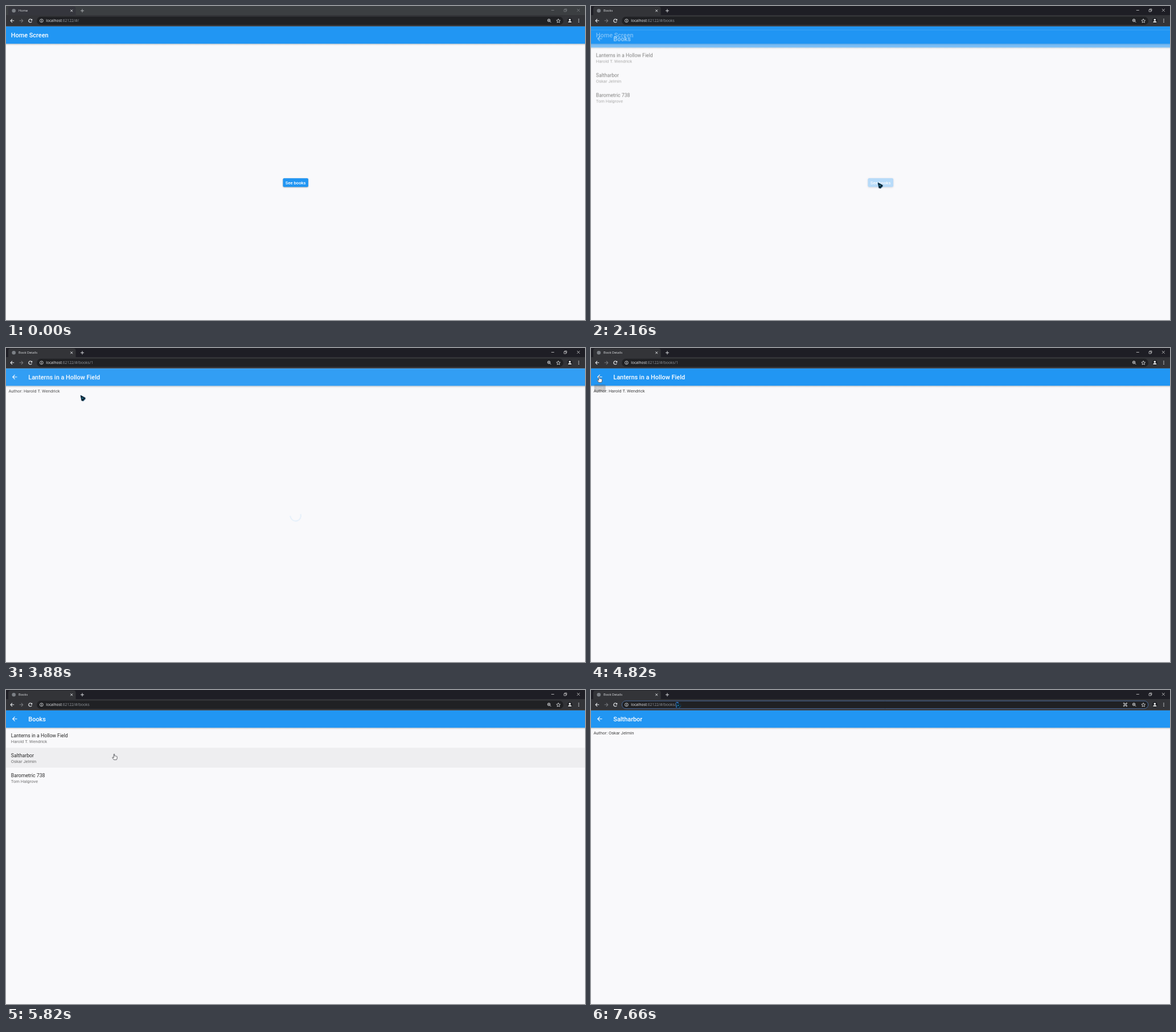
An HTML page with a canvas for the animation above (8000 ms loop, 1017x551 px).

```html
<!DOCTYPE html>
<html lang="en">
<head>
<meta charset="utf-8">
<title>Books</title>
<style>
html, body { margin: 0; width: 100%; height: 100%; overflow: hidden; background: #fafafb; }
canvas { display: block; width: 1017px; height: 551px; }
</style>
</head>
<body>
<canvas id="stage"></canvas>
<script>
const W = 1017, H = 551, LOOP = 8000, TOP = 35.6, BAR = 66.2, ROW = 35;
const dpr = window.devicePixelRatio || 1;
const BLUE = '#2196f3', PAGE = '#f9f9fb';
const UI = '"Open Sans", "Noto Sans", sans-serif';
const APP = 'Roboto, "Liberation Sans", sans-serif';
const BOOKS = [
  ['Lanterns in a Hollow Field', 'Harold T. Wendrick'],
  ['Saltharbor', 'Oskar Jelmin'],
  ['Barometric 738', 'Tom Halgrove']
];
const OPEN_LIST = 1944, POP = 4980, FADE = 300, LOAD = 25;
const VISITS = [{ book: 0, from: 3570, to: POP }, { book: 1, from: 6115, to: LOOP }];

function makeCanvas(el) {
  el.width = W * dpr;
  el.height = H * dpr;
  const c = el.getContext('2d');
  c.scale(dpr, dpr);
  return c;
}
const stage = makeCanvas(document.getElementById('stage'));
const buffer = makeCanvas(document.createElement('canvas'));
let g = stage;

const clamp = v => Math.max(0, Math.min(1, v));
const smooth = v => v * v * (3 - 2 * v);

function bezier(x1, y1, x2, y2) {
  const at = (a, b, s) => 3 * (1 - s) * (1 - s) * s * a + 3 * (1 - s) * s * s * b + s * s * s;
  return x => {
    if (x <= 0 || x >= 1) return clamp(x);
    let lo = 0, hi = 1;
    for (let i = 0; i < 20; i++) {
      const mid = (lo + hi) / 2;
      if (at(x1, x2, mid) < x) lo = mid; else hi = mid;
    }
    return at(y1, y2, lo);
  };
}
const fastOutSlowIn = bezier(0.4, 0, 0.2, 1);
const easeIn = bezier(0.42, 0, 1, 1);

// Drawing helpers
function rect(x, y, w, h, color, r = 0) {
  g.fillStyle = color;
  g.beginPath();
  if (r) g.roundRect(x, y, w, h, r); else g.rect(x, y, w, h);
  g.fill();
}
function circle(x, y, r, color) {
  g.fillStyle = color;
  g.beginPath();
  g.arc(x, y, r, 0, 7);
  g.fill();
}
function arc(x, y, r, color, width, a = 0, b = Math.PI * 2) {
  g.strokeStyle = color;
  g.lineWidth = width;
  g.beginPath();
  g.arc(x, y, r, a, b);
  g.stroke();
}
function text(str, x, y, size, color, family = APP, weight = 400, align = 'left') {
  g.font = `${weight} ${size}px ${family}`;
  g.fillStyle = color;
  g.textAlign = align;
  g.fillText(str, x, y);
  return g.measureText(str).width;
}
function shape(d, x, y, scale, fill, stroke, width = 1) {
  const p = new Path2D(d);
  g.save();
  g.translate(x, y);
  g.scale(scale, scale);
  if (fill) { g.fillStyle = fill; g.fill(p); }
  if (stroke) { g.strokeStyle = stroke; g.lineWidth = width; g.lineJoin = 'round'; g.stroke(p); }
  g.restore();
}

// Pointer: time, x, y
const TRACK = [
  [180, 440, 304], [420, 425, 300], [760, 130, 27], [1050, 112, 29],
  [1580, 509, 311], [1700, 504, 310], [2400, 504, 310], [2500, 470, 288],
  [2820, 142, 28], [2960, 138, 31], [3180, 131, 83], [4130, 131, 83],
  [4430, 142, 24], [4740, 14, 50], [4980, 15, 50], [5180, 29.5, 60],
  [5460, 128, 25], [5760, 190, 112], [6180, 190, 112], [6400, 189.5, 92.5],
  [6600, 168, 62], [6900, 147, 22], [7570, 147, 22], [7660, 149.5, 22]
];
function pointer(t) {
  if (t < TRACK[0][0]) return null;
  const i = TRACK.findIndex(k => k[0] > t);
  if (i < 0) return TRACK[TRACK.length - 1].slice(1);
  const a = TRACK[i - 1], b = TRACK[i];
  const p = smooth((t - a[0]) / (b[0] - a[0]));
  return [a[1] + (b[1] - a[1]) * p, a[2] + (b[2] - a[2]) * p];
}
function handShown(t, x, y) {
  if (t < OPEN_LIST) return x > 486 && x < 531 && y > 302 && y < 318;
  if (t > POP - 300 && t < 5230) return x < 31 && y > 40;
  return listActive(t) && y > BAR && y < BAR + ROW * 3;
}
function drawPointer(t) {
  const pos = pointer(t);
  if (!pos) return;
  const [x, y] = pos;
  if (handShown(t, x, y)) {
    shape('M-.8 .8Q0-.5 .8 .8V4Q1.7 3.2 2.5 4.1Q3.4 3.5 4 4.4Q5.2 4 5.2 5.4V8Q4.8 9 4.2 10.4H-.6L-3 7.2Q-3.6 5.7-2.3 5.8L-.8 7Z',
      x, y, 1, '#f7f7f8', '#55565c', 0.9);
    return;
  }
  g.save();
  g.shadowColor = 'rgba(40,90,140,.55)';
  g.shadowBlur = 2 * dpr;
  shape('M0 0L8.3 4.2L8.4 6.5L4.5 10.2L1.5 9.3Z', x, y, 1, '#10202c');
  g.restore();
  shape('M0 0L7.2 4.7L4.1 5.5L2.2 8.4Z', x, y, 1, '#07131c', '#164a68', 0.6);
  shape('M2.2 3.4L5 4.8L3.1 6.2Z', x, y, 1, '#2fb4d8');
  g.strokeStyle = '#1c83b8';
  g.lineWidth = 0.8;
  g.beginPath();
  g.moveTo(x + 4.5, y + 9.6);
  g.lineTo(x + 8, y + 6.3);
  g.stroke();
}

// App pages
function listActive(t) {
  return t >= OPEN_LIST + FADE && !VISITS.some(v => t >= v.from && t < v.to) &&
    !(t >= POP && t < POP + FADE);
}
function appBar(title, back) {
  const fade = g.createLinearGradient(0, BAR, 0, BAR + 3.4);
  fade.addColorStop(0, 'rgba(0,0,0,.27)');
  fade.addColorStop(0.4, 'rgba(0,0,0,.1)');
  fade.addColorStop(1, 'rgba(0,0,0,0)');
  rect(0, BAR, W, 3.4, fade);
  rect(0, TOP, W, BAR - TOP, BLUE);
  if (back) shape('M20 11H7.83l5.59-5.59L12 4l-8 8 8 8 1.41-1.41L7.83 13H20v-2z', 8.8, 44.4, 0.535, '#fff');
  text(title, back ? 39.3 : 8.8, 54.8, 10.9, '#fff', APP, 500);
}
function splash(t, start, box, color, speed) {
  const age = t - start, pos = pointer(t);
  if (age < 0 || age > 600 || !pos) return;
  g.save();
  g.beginPath();
  g.rect(...box);
  g.clip();
  circle(pos[0], pos[1], 4 + age * speed, color);
  g.restore();
}
function home(t) {
  rect(0, TOP, W, H, PAGE);
  const pos = pointer(t);
  const hot = pos && t < 2244 && pos[0] > 486 && pos[0] < 531 && pos[1] > 302 && pos[1] < 318;
  g.save();
  g.shadowColor = 'rgba(0,0,0,.35)';
  g.shadowBlur = (hot ? 3 : 2) * dpr;
  g.shadowOffsetY = 0.8 * dpr;
  rect(486.5, 302.2, 44.4, 15.3, BLUE, 2);
  g.restore();
  if (hot) rect(486.5, 302.2, 44.4, 15.3, 'rgba(255,255,255,.08)', 2);
  splash(t, 1800, [486.5, 302.2, 44.4, 15.3], 'rgba(255,255,255,.2)', 0.14);
  text('See books', 508.6, 312.7, 7.64, '#fff', APP, 500, 'center');
  appBar('Home Screen', false);
}
function list(t) {
  rect(0, TOP, W, H, PAGE);
  const pos = pointer(t);
  const over = pos ? Math.floor((pos[1] - BAR) / ROW) : -1;
  BOOKS.forEach(([title, author], i) => {
    const y = BAR + ROW * i;
    const held = VISITS.some(v => v.book === i && t >= v.from && t < v.from + FADE);
    if (held || (over === i && listActive(t))) rect(0, y, W, ROW, 'rgba(0,0,0,.045)');
    const visit = VISITS.find(v => v.book === i);
    if (visit) splash(t, visit.from - 160, [0, y, W, ROW], 'rgba(0,0,0,.07)', 0.6);
    text(title, 8.8, y + 16.9, 8.73, 'rgba(0,0,0,.84)');
    text(author, 8.8, y + 26.4, 7.6, 'rgba(0,0,0,.54)');
  });
  appBar('Books', true);
}
function loading(age) {
  rect(0, TOP, W, H, PAGE);
  const cycle = (age / 1333) % 1;
  const head = fastOutSlowIn(clamp(cycle * 2)), tail = fastOutSlowIn(clamp(cycle * 2 - 1));
  const start = Math.PI * (-0.5 + 1.5 * tail + 2 * age / 2222 + 0.5 * cycle);
  arc(508.7, 294.3, 9.3, BLUE, 2.2, start, start + Math.max(0.01, 1.5 * Math.PI * (head - tail)));
}
function details(i) {
  rect(0, TOP, W, H, PAGE);
  text('Author: ' + BOOKS[i][1], 4.4, 77.7, 7.64, 'rgba(0,0,0,.74)');
  appBar(BOOKS[i][0], true);
}

// Fades a page in while it rises from a quarter of the view height.
function rise(age, page) {
  const p = clamp(age / FADE);
  if (p <= 0) return;
  g = buffer;
  g.clearRect(0, 0, W, H);
  page();
  g = stage;
  g.save();
  g.beginPath();
  g.rect(0, TOP, W, H);
  g.clip();
  g.globalAlpha = easeIn(p);
  g.drawImage(buffer.canvas, 0, (1 - fastOutSlowIn(p)) * (H - TOP) / 4, W, H);
  g.restore();
}
function drawApp(t) {
  if (t < OPEN_LIST + FADE) home(t);
  rise(t - OPEN_LIST, () => list(t));
  VISITS.forEach(v => {
    if (t < v.from || t >= v.to) return;
    const age = t - v.from;
    rise(age, () => loading(age));
    rise(age - LOAD, () => details(v.book));
  });
  if (t >= POP && t < POP + FADE) rise(FADE - (t - POP), () => loading(t - POP));

  const tip = clamp((t - 4780) / 120) * clamp((5420 - t) / 120);
  if (tip > 0) {
    g.save();
    g.globalAlpha = tip;
    rect(5.6, 64, 20, 12.6, 'rgba(92,92,94,.94)', 2);
    text('Back', 15.6, 72.2, 5.45, '#fff', APP, 400, 'center');
    g.restore();
  }
}

// Browser frame
function drawBrowser(t) {
  const focused = t >= 320, editing = t >= 6940;
  const visit = VISITS.find(v => t >= v.from && t < v.to);
  const title = t < OPEN_LIST ? 'Home' : visit ? 'Book Details' : 'Books';
  const path = t < OPEN_LIST ? ':62122/#/' : ':62122/#/books' + (visit ? '/' + (visit.book + 1) : '');
  const ink = '#e8eaed', dim = '#8f9399', tool = '#333438';

  rect(0, 0, W, TOP, focused ? '#1e1e25' : '#3c3f42');
  rect(0, 16, W, TOP - 16, tool);
  g.fillStyle = focused ? tool : '#35363d';
  g.beginPath();
  g.roundRect(4, 0.8, 118.5, 16, [4, 4, 0, 0]);
  g.fill();
  circle(13.7, 8.2, 3.3, '#7c8086');
  text(title, 22, 10.2, 5.7, '#dfe1e5', UI);
  shape('M-2-2L2 2M2-2L-2 2', 115.2, 8.3, 0.95, null, ink, 1);
  shape('M-3 0H3M0-3V3', 134, 8.3, 1, null, focused ? ink : '#b5b8bc', 0.9);

  const win = focused ? '#f1f1f1' : '#898c90';
  shape('M-2.5 0H2.5', 960.3, 7.5, 1, null, win, 0.7);
  shape('M-2.4-1.2H1.2V2.4H-2.4ZM-1.2-1.2V-2.4H2.4V1.2H1.2', 982.5, 7.5, 1, null, win, 0.65);
  shape('M-2.4-2.4L2.4 2.4M2.4-2.4L-2.4 2.4', 1005.4, 7.4, 1, null, win, 0.7);

  const arrow = 'M3.2 0H-3M0-3L-3 0L0 3';
  shape(arrow, 11, 25.8, 1, null, ink, 1.1);
  g.save();
  g.translate(26.8, 25.8);
  g.scale(-1, 1);
  shape(arrow, 0, 0, 1, null, '#77797d', 1.1);
  g.restore();
  arc(42.8, 25.9, 2.9, ink, 1.1, 0.5, 5.5);
  shape('M3.4-3.4V-.4H.4Z', 42.8, 25.9, 1, ink);

  rect(54, 18.8, 925, 14.2, '#202124', 7.1);
  if (editing) {
    g.strokeStyle = '#4f6f9f';
    g.lineWidth = 1;
    g.beginPath();
    g.roundRect(54.3, 19.1, 924.4, 13.6, 6.8);
    g.stroke();
  }
  arc(62.4, 25.8, 2.9, ink, 0.8);
  rect(62, 25.3, 0.9, 2.2, ink);
  rect(62, 23.9, 0.9, 0.9, ink);

  const size = 6.65, x = 70.2;
  g.font = `400 ${size}px ${UI}`;
  const hostW = g.measureText('localhost').width, pathW = g.measureText(path).width;
  const end = x + hostW + pathW;
  if (t >= 6940 && t < 7200) rect(x, 21, end - x, 10, '#2f6fc4');
  text('localhost', x, 28.1, size, ink, UI);
  text(path, x + hostW, 28.1, size, '#92969c', UI);
  if (t >= 7620) {
    const w = g.measureText('2').width;
    rect(end - w, 21, w + 0.6, 10, '#2f6fc4');
    text('2', end - w, 28.1, size, '#fff', UI);
  }

  if (editing) {
    g.strokeStyle = ink;
    g.lineWidth = 0.8;
    g.strokeRect(937, 24.3, 2.8, 2.8);
    for (const sx of [-1, 1]) for (const sy of [-1, 1]) arc(938.4 + sx * 2.3, 25.7 + sy * 2.3, 0.9, ink, 0.8);
  }
  arc(953.6, 25.2, 2.3, ink, 0.9);
  shape('M1.7 1.7L3.8 3.8M-1.1 0H1.1M0-1.1V1.1', 953.6, 25.2, 1, null, ink, 0.8);
  shape('M0-3.4L1-1.1L3.4-.9L1.6 .8L2.1 3.2L0 2L-2.1 3.2L-1.6 .8L-3.4-.9L-1-1.1Z', 970.2, 26, 1, null, ink, 0.8);
  circle(990.3, 25.8, 4.8, '#202226');
  circle(990.3, 24.2, 1.6, '#fff');
  shape('M-3 3V2Q0-.6 3 2V3Z', 990.3, 25.8, 1, '#fff');
  for (const y of [23.3, 25.8, 28.3]) circle(1006, y, 0.8, ink);
}

function frame() {
  const t = performance.now() % LOOP;
  g = stage;
  rect(0, 0, W, H, PAGE);
  drawApp(t);
  drawBrowser(t);
  drawPointer(t);
  requestAnimationFrame(frame);
}
frame();
</script>
</body>
</html>
```
